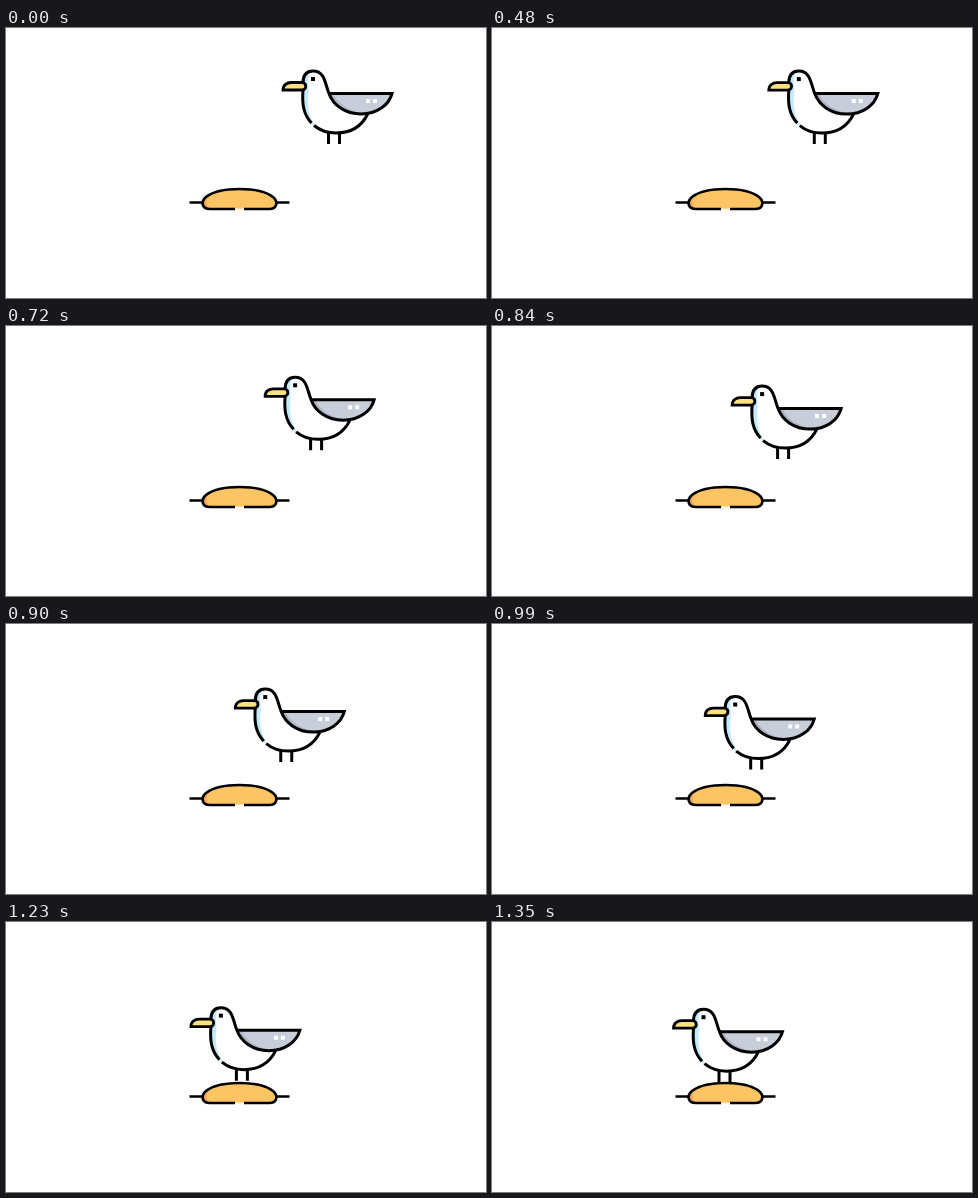
Recreate the animation shown at these times as an HTML page. Size 480 px wide and 270 px high, loop 1830 ms.

```html
<!DOCTYPE html>
<html lang="en">
<head>
<meta charset="utf-8">
<title>Gull landing on a bun</title>
<style>
  html, body { margin: 0; height: 100%; overflow: hidden; background: #fff; }
  svg { display: block; width: 100vw; height: 100vh; }
  .line { fill: none; stroke: #000; stroke-width: 3; }
</style>
</head>
<body>
<svg viewBox="0 0 480 270">
  <defs>
    <path id="bunShape" d="M204 181C195 181 195 173 200 169C207 163.500 220 161 233.500 161S260 163.500 267 169C272 173 272 181 263 181Z"/>
    <path id="bodyShape" d="M297 62C293 80 300 105 330 105C345 105 357 97 362 85L323 65C319 56 319 43 307 43C300 43 297 48 297 55Z"/>
    <clipPath id="bunClip"><use href="#bunShape"/></clipPath>
    <clipPath id="bodyClip"><use href="#bodyShape"/></clipPath>
  </defs>

  <g id="bun">
    <use href="#bunShape" fill="#fdc463"/>
    <path d="M206 164C198 169 199 178 205 182H194V164Z" fill="#f6a356" clip-path="url(#bunClip)"/>
    <path class="line" style="stroke-width:2.700" d="M229 181H204C195 181 195 173 200 169C207 163.500 220 161 233.500 161S260 163.500 267 169C272 173 272 181 263 181H238M183.500 174.500H197M270 174.500H283.500"/>
    <path d="M230 181.200H237.500" stroke="#fff0d5" stroke-width="2" stroke-dasharray="2 .8"/>
  </g>

  <g id="gull">
    <path class="line" d="M322.500 104V116M333.500 104V116"/>
    <use href="#bodyShape" fill="#fff"/>
    <path d="M305 43C300 50 303 56 302.500 65C301 76 302 88 310 99L300 101L290 70L296 43Z" fill="#c3eafa" clip-path="url(#bodyClip)"/>
    <path d="M323 65.500H386C383 77 371 86 355 86C339 86 327 77 323 65.500Z" fill="#c8ced9"/>
    <path d="M324 67C329 79 341 85 355 85C342 82 332 76 328 67Z" fill="#adb4c3"/>
    <path d="M360 71h4v4h-4zM367 71h4v4h-4z" fill="#fff"/>
    <path class="line" d="M297 55C297 48 300 43 307 43C319 43 319 56 323 65.500C327 77 339 86 355 86C371 86 383 77 386 65.500H323M297 62C296 75 297 86 305.500 95M308 97.500C314 102.500 321 105 330 105C345 105 356 98 362 85.500"/>
    <path class="line" d="M277 62C277 57 281 54.500 285 54.500H296C301 54.500 301 62 296 62Z" style="fill:#fbe27c;stroke-width:2.800"/>
    <path d="M305 49h4v4h-4z"/>
  </g>
</svg>
<script>
  const LOOP = 1830, TICK = 30, START = 450, DURATION = 900;
  const TRAVEL = { x: -95.5, y: 44.2 };
  const gull = document.getElementById('gull');

  // cubic-bezier(.42, 0, .58, 1), solved by bisection
  function easeInOut(t) {
    let low = 0, high = 1;
    for (let i = 0; i < 24; i++) {
      const s = (low + high) / 2, r = 1 - s;
      const x = 1.26 * s * r * r + 1.74 * s * s * r + s * s * s;
      if (x < t) low = s; else high = s;
    }
    return low * low * (3 - 2 * low);
  }

  function draw() {
    const time = Math.floor(performance.now() % LOOP / TICK) * TICK;
    const progress = Math.min(1, Math.max(0, (time - START) / DURATION));
    const p = easeInOut(progress);
    gull.setAttribute('transform', `translate(${TRAVEL.x * p} ${TRAVEL.y * p})`);
    requestAnimationFrame(draw);
  }
  draw();
</script>
</body>
</html>
```
